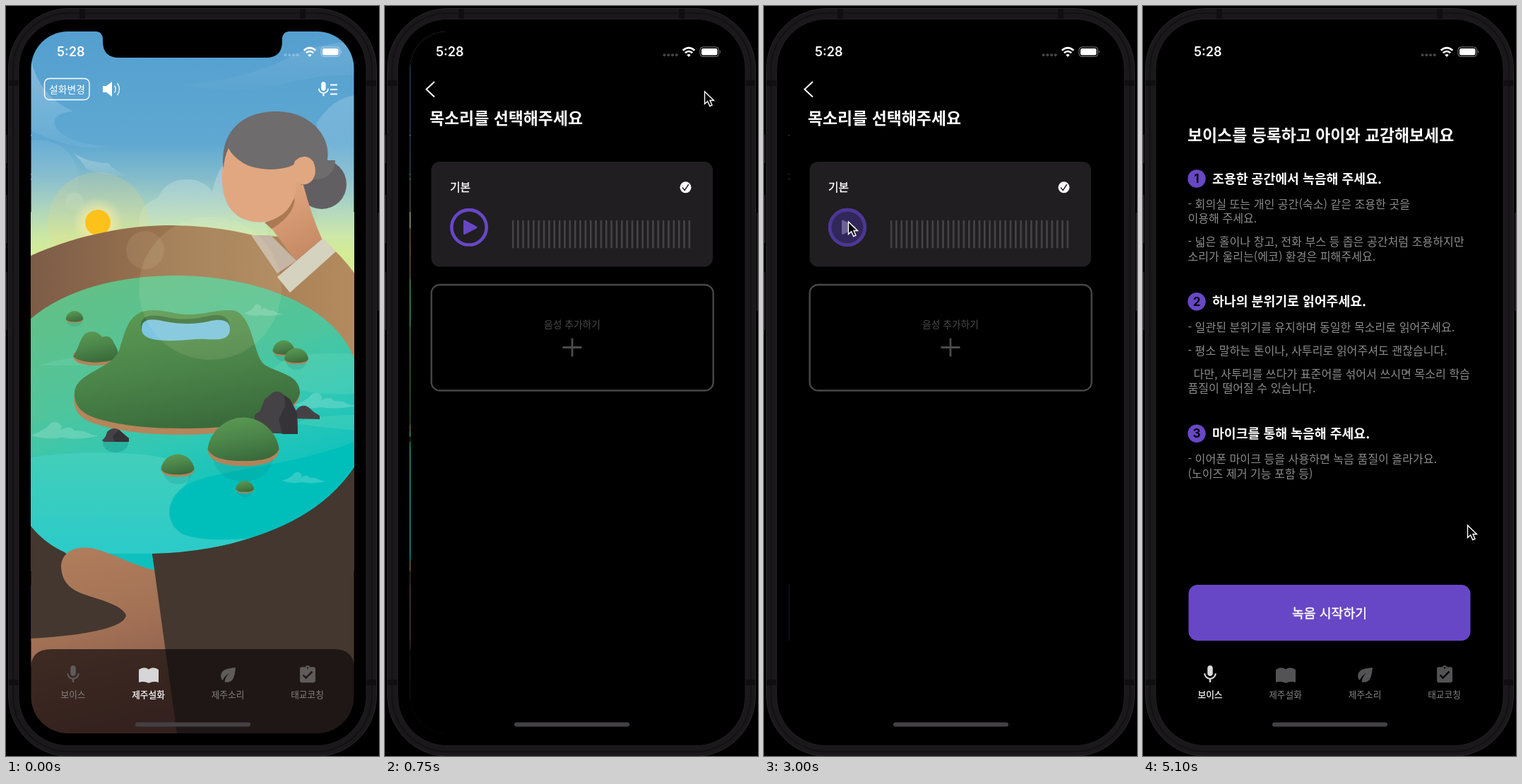
An HTML page that plays this animation: 528x1060 px, repeating every 5.2 s.

```html
<!DOCTYPE html>
<html lang="ko">
<head>
<meta charset="utf-8">
<title>Voice app walkthrough</title>
<style>
html, body { margin: 0; width: 100%; height: 100%; overflow: hidden; background: #000; }
svg { display: block; }
text { font-family: "Noto Sans CJK KR", "Noto Sans KR", "Noto Sans", sans-serif; fill: #fff; white-space: pre; }
.title { font-size: 22.9px; font-weight: 700; }
.head { font-size: 18.3px; font-weight: 700; }
.body text { font-size: 16.1px; fill: #8b8b8b; }
.num { font: 700 17px Inter, sans-serif; fill: #000; text-anchor: middle; }
.medium { stroke: #fff; stroke-width: .4px; }
.tab { font-size: 12.7px; text-anchor: middle; fill: #858283; }
.tab.on { fill: #fff; stroke: #fff; stroke-width: .25px; }
.mid { text-anchor: middle; }

/* one shared 5.2 s timeline */
.home, .picker, .voice, .cursor, .card, .pressed { animation: 5.2s linear infinite; }
.home { animation-name: home; }
.picker { animation-name: picker; }
.voice { animation-name: voice; }
.cursor { animation-name: cursor; animation-timing-function: ease-in-out; }
.card { animation-name: card; }
.pressed { animation-name: pressed; }

@keyframes home {
  0%, 9.94% { transform: translateX(0); opacity: 1; }
  10.58% { transform: translateX(-46px); }
  11.54% { transform: translateX(-110px); }
  12.5% { transform: translateX(-131px); }
  13.46%, 16.3% { transform: translateX(-136px); opacity: 1; }
  16.31%, 100% { transform: translateX(-137px); opacity: 0; }
}
@keyframes picker {
  0%, 9.94% { transform: translateX(458px); }
  10.58% { transform: translateX(305px); }
  11.54% { transform: translateX(92px); }
  12.5% { transform: translateX(22px); }
  13.46% { transform: translateX(5px); }
  14.42% { transform: translateX(1px); }
  15.38%, 74.58% { transform: translateX(0); }
  75% { transform: translateX(87px); }
  75.96% { transform: translateX(337px); }
  76.92% { transform: translateX(428px); }
  77.88% { transform: translateX(451px); }
  79.8%, 100% { transform: translateX(458px); }
}
@keyframes voice {
  0%, 74.58% { transform: translateX(-137px); }
  75% { transform: translateX(-111px); }
  75.96% { transform: translateX(-36px); }
  76.92% { transform: translateX(-9px); }
  77.88% { transform: translateX(-2px); }
  79.8%, 100% { transform: translateX(0); }
}
@keyframes cursor {
  0%, 1.91% { transform: translate(461px, 330px); opacity: 0; }
  1.92% { transform: translate(461px, 330px); opacity: 1; }
  8.65%, 18.85% { transform: translate(452px, 120px); }
  28.85%, 44.8% { transform: translate(183px, 259px); }
  54.8%, 65.4% { transform: translate(119px, 304px); }
  72.1%, 93.65% { transform: translate(273px, 484px); }
  98.05%, 100% { transform: translate(459px, 733px); opacity: 1; }
}
@keyframes card {
  0%, 29.5% { opacity: 1; }
  32.6%, 38.1% { opacity: .2; }
  42.3%, 100% { opacity: 1; }
}
@keyframes pressed {
  0%, 55.4% { opacity: 0; }
  57.7%, 65.2% { opacity: 1; }
  68.3%, 100% { opacity: 0; }
}
</style>
</head>
<body>
<svg width="528" height="1060" viewBox="0 0 528 1060">
<defs>
  <clipPath id="screen"><rect x="35.5" y="36" width="457" height="992" rx="52"/></clipPath>
  <linearGradient id="sky" gradientUnits="userSpaceOnUse" x1="0" y1="37" x2="0" y2="350">
    <stop offset="0" stop-color="#559fd0"/><stop offset=".5" stop-color="#5ea8d2"/>
    <stop offset=".66" stop-color="#84bccb"/><stop offset=".8" stop-color="#add5bc"/>
    <stop offset=".92" stop-color="#cbe7a4"/><stop offset="1" stop-color="#d5ec96"/>
  </linearGradient>
  <linearGradient id="mist" x1="0" y1="0" x2="0" y2="1">
    <stop offset="0" stop-color="#fff" stop-opacity=".28"/><stop offset="1" stop-color="#fff" stop-opacity=".05"/>
  </linearGradient>
  <radialGradient id="glow">
    <stop offset=".45" stop-color="#fff0a8" stop-opacity=".6"/><stop offset="1" stop-color="#fff0a8" stop-opacity="0"/>
  </radialGradient>
  <linearGradient id="robe">
    <stop offset="0" stop-color="#7d5c47"/><stop offset=".45" stop-color="#9d7650"/><stop offset="1" stop-color="#b48b5e"/>
  </linearGradient>
  <linearGradient id="sea" x1=".32" y1="0" x2=".68" y2="1">
    <stop offset="0" stop-color="#62c087"/><stop offset=".32" stop-color="#50c59c"/>
    <stop offset=".53" stop-color="#30c8b5"/><stop offset=".74" stop-color="#10c2bd"/><stop offset="1" stop-color="#0abfbf"/>
  </linearGradient>
  <linearGradient id="bay" x1="0" y1="0" x2="0" y2="1">
    <stop offset="0" stop-color="#43ceba"/><stop offset="1" stop-color="#2bcbc9"/>
  </linearGradient>
  <linearGradient id="grass" x1=".3" y1="0" x2=".6" y2="1">
    <stop offset="0" stop-color="#5a9953"/><stop offset=".5" stop-color="#4b8449"/><stop offset="1" stop-color="#396a3a"/>
  </linearGradient>
  <linearGradient id="skin" x1="0" y1="0" x2=".2" y2="1">
    <stop offset="0" stop-color="#b17f5c"/><stop offset=".45" stop-color="#a47356"/><stop offset="1" stop-color="#87574a"/>
  </linearGradient>
  <linearGradient id="neck" x1="0" y1="0" x2=".3" y2="1">
    <stop offset=".3" stop-color="#dfa47d"/><stop offset="1" stop-color="#c78c66"/>
  </linearGradient>
  <pattern id="bars" patternUnits="userSpaceOnUse" x="178.7" y="303" width="7.35" height="40">
    <rect width="2.5" height="39.5" fill="#464547"/>
  </pattern>
  <g id="islet">
    <ellipse cy="2" rx="43" ry="38" fill="#087f7c" opacity=".18"/>
    <path d="M-50-6C-50 11-30 18 0 18S50 11 50-6Z" fill="#b3835a"/>
    <path d="M-50-6C-47-30-25-50 0-50S47-30 50-6C45 7 26 11 0 11S-45 7-50-6Z" fill="url(#grass)"/>
  </g>
  <g id="wave" fill="#dff5ee" opacity=".22">
    <path d="M0 18Q14 14 22 7Q29-3 38 3Q43 8 38 12Q52 4 57 12L70 13Q78 18 90 19Q58 25 40 21Q20 25 0 18Z"/>
  </g>
  <path id="mic" d="M12 14c1.66 0 3-1.34 3-3V5c0-1.66-1.34-3-3-3S9 3.34 9 5v6c0 1.66 1.34 3 3 3zm5.3-3c0 3-2.54 5.1-5.3 5.1S6.7 14 6.7 11H5c0 3.4 2.7 6.2 6 6.7V21h2v-3.3c3.3-.5 6-3.3 6-6.7z"/>
  <path id="book" d="M188 938Q195 933 202 937.5Q209 933 216 938V956Q209 953.5 202 957Q195 953.5 188 956Z"/>
  <path id="leaf" d="M6 8c-2.7 2.7-2.7 7.2 0 9.9 1.5-3.4 4.1-6.2 7.4-7.9-2.8 2.3-4.7 5.6-5.4 9.3 2.6 1.2 5.8.8 8-1.4C19.4 14.5 20 4 20 4S9.5 4.6 6 8z"/>
  <path id="clip" d="M19 3h-4.2a3 3 0 0 0-5.6 0H5a2 2 0 0 0-2 2v14c0 1.1.9 2 2 2h14a2 2 0 0 0 2-2V5a2 2 0 0 0-2-2zm-7 0a1 1 0 1 1 0 2 1 1 0 0 1 0-2zm-2 14-4-4 1.4-1.4 2.6 2.6 6.6-6.6L18 9z"/>
  <use id="micTab" href="#mic" transform="translate(80 929.5) scale(1.25)"/>
  <g id="lastTabs">
    <use href="#leaf" transform="translate(299 929.8) scale(1.3)"/>
    <use href="#clip" transform="translate(412.4 930.6) scale(1.22)"/>
    <text class="tab" x="314" y="977.7">제주소리</text>
    <text class="tab" x="426.5" y="977.7">태교코칭</text>
  </g>
</defs>

<!-- phone body -->
<g fill="#1d1b1e">
  <path d="M0 182h2v40h-2zM0 267h2v68h-2zM0 376h2v82h-2zM526 292h2v139h-2z"/>
  <rect x="3.5" y="3.5" width="521" height="1057" rx="86" fill="#1a181b" stroke="#29272a"/>
  <rect x="10" y="10" width="508" height="1044" rx="79" fill="none" stroke="#131114" stroke-width="2"/>
  <path d="M104 4h8v14h-8zM416 4h8v14h-8zM4 105h14v8h-14zM510 105h14v8h-14zM4 952h14v8h-14zM510 952h14v8h-14z" fill="#100e11"/>
  <rect x="18" y="18.5" width="492" height="1027" rx="70" fill="#000" stroke="#211f23"/>
</g>

<g clip-path="url(#screen)">
  <!-- voice guide -->
  <g class="voice">
    <rect x="35" y="36" width="460" height="993" fill="#000"/>
    <text class="title" x="63" y="190.5">보이스를 등록하고 아이와 교감해보세요</text>
    <g fill="#6847c6"><circle cx="76" cy="244" r="12.7"/><circle cx="76" cy="417.7" r="12.7"/><circle cx="76" cy="604.3" r="12.7"/></g>
    <text class="num" x="76" y="250">1</text>
    <text class="num" x="76" y="423.8">2</text>
    <text class="num" x="76" y="610.4">3</text>
    <text class="head" x="98" y="250.7">조용한 공간에서 녹음해 주세요.</text>
    <text class="head" x="98" y="424.4">하나의 분위기로 읽어주세요.</text>
    <text class="head" x="98" y="611">마이크를 통해 녹음해 주세요.</text>
    <g class="body">
      <text x="63.5" y="285.5">- 회의실 또는 개인 공간(숙소) 같은 조용한 곳을</text>
      <text x="63.5" y="306">이용해 주세요.</text>
      <text x="63.5" y="339">- 넓은 홀이나 창고, 전화 부스 등 좁은 공간처럼 조용하지만</text>
      <text x="63.5" y="359.5">소리가 울리는(에코) 환경은 피해주세요.</text>
      <text x="63.5" y="459.5">- 일관된 분위기를 유지하며 동일한 목소리로 읽어주세요.</text>
      <text x="63.5" y="492.5">- 평소 말하는 톤이나, 사투리로 읽어주셔도 괜찮습니다.</text>
      <text x="71.5" y="525.5">다만, 사투리를 쓰다가 표준어를 섞어서 쓰시면 목소리 학습</text>
      <text x="63.5" y="546">품질이 떨어질 수 있습니다.</text>
      <text x="63.5" y="646">- 이어폰 마이크 등을 사용하면 녹음 품질이 올라가요.</text>
      <text x="63.5" y="666.5">(노이즈 제거 기능 포함 등)</text>
    </g>
    <rect x="64.5" y="818" width="399" height="79" rx="13" fill="#6847c6"/>
    <text class="mid medium" x="264" y="864.5" font-size="18.3">녹음 시작하기</text>
    <g fill="#535254">
      <use href="#micTab" fill="#dcdcdc"/><use href="#book"/><use href="#lastTabs"/>
      <text class="tab on" x="95" y="977.7">보이스</text><text class="tab" x="201.5" y="977.7">제주설화</text>
    </g>
  </g>

  <!-- story home -->
  <g class="home">
    <rect x="35" y="36" width="460" height="993" fill="url(#sky)"/>
    <g fill="url(#mist)">
      <path d="M35 74Q46 127 95 149Q63 151 70 171Q83 193 146 199Q100 207 35 176Z"/>
      <path d="M96 208Q117 222 145 222Q153 233 171 240Q128 239 114 230Q106 218 96 208Z"/>
      <path d="M495 50Q430 53 390 78Q330 105 250 112Q340 126 400 108Q450 96 495 98Z" opacity=".4"/>
      <path d="M440 165Q462 130 495 126V330H440Z" opacity=".65"/>
      <path d="M188 312C188 278 205 278 216 270C228 238 278 238 292 263C302 210 340 190 370 220V350H188Z"/>
      <path d="M35 190C80 185 105 215 103 254C99 275 70 300 35 290Z" opacity=".3"/>
      <circle cx="97" cy="277" r="13" opacity=".5"/>
    </g>
    <circle cx="130" cy="306" r="71" fill="#f0d878" opacity=".2"/>
    <circle cx="130" cy="306" r="36" fill="url(#glow)"/>
    <circle cx="130" cy="306" r="18" fill="#fcc21b"/>

    <!-- robe -->
    <path d="M35 353C88 329 158 311 225 310C275 310 315 315 350 324L447 329Q475 352 495 380V1029H35Z" fill="url(#robe)"/>
    <path d="M35 700L207 774L495 600V1029H35Z" fill="#44372f"/>

    <!-- head -->
    <circle cx="447" cy="252" r="35" fill="#625f62"/>
    <path d="M405 230L421 253Q432 295 447 329L410 360L372 309Z" fill="url(#neck)"/>
    <path d="M366 306Q390 299 409 271Q408 296 376 315Z" fill="#ab7953"/>
    <path d="M315 200C302 226 303 264 316 284C330 307 366 312 387 297C402 289 410 272 411 250L425 215Z" fill="#e1a780"/>
    <path d="M308 230C302 180 332 149 383 149C432 149 461 186 455 218L466 218C466 237 450 246 436 245L418 253L412 221C395 235 354 233 336 222Q321 213 315 201Q309 213 308 230Z" fill="#6e6c6d"/>
    <path d="M411 247Q403 232 409 219Q424 206 435 220Q442 237 432 248Q421 257 411 247Z" fill="#e1a780"/>
    <path d="M347 324H375L411 360L384 378Z" fill="#c4b5a4"/>
    <path d="M384 383L449 328L467 347L402 405Z" fill="#d5d2bf"/>

    <!-- sea -->
    <path d="M35 442C85 400 160 381 240 381C360 381 475 428 495 506V648C450 722 330 774 207 774L212 805H120L83 772Q54 759 35 735Z" fill="url(#sea)"/>
    <path d="M35 638Q110 627 195 634C250 640 275 660 248 682C222 704 228 738 254 748Q285 758 345 752Q275 774 207 774H83Q54 759 35 735Z" fill="url(#bay)"/>
    <path d="M495 615C410 650 300 655 260 675C223 695 225 732 250 746Q285 758 345 752Q450 720 495 648Z" fill="#00bfbb"/>
    <g fill="#7be0c0" opacity=".22">
      <path d="M48 508Q80 496 130 494L160 508Z"/>
      <path d="M400 495Q455 489 495 492V548Q440 550 418 543Q396 525 376 514Z"/>
      <path d="M410 590Q440 577 495 578V600Q450 596 410 590Z"/>
    </g>
    <use href="#wave" transform="translate(337 421) scale(.6 .75)"/>
    <use href="#wave" transform="translate(407 546)"/>
    <use href="#wave" transform="translate(35 587) scale(1.08)"/>
    <use href="#wave" transform="translate(391 658) scale(.68 .72)"/>

    <!-- islands -->
    <use href="#islet" transform="translate(97 443.5) scale(.25)"/>
    <path d="M96 497C97 512 152 511 159 499V490H96Z" fill="#b3835a"/>
    <path d="M95 495C106 480 105 460 122 460Q130 460 136 468Q148 463 153 477Q159 485 159 495C150 506 105 507 95 495Z" fill="url(#grass)"/>
    <path d="M97 548C94 571 103 583 128 591C166 603 208 606 250 606C330 606 417 585 416 545Z" fill="#b5855b"/>
    <path d="M97 546C99 518 148 514 160 487C169 461 172 430 207 430C232 430 240 437 263 436C286 435 297 429 319 430C350 432 349 493 366 507C384 519 416 520 416 547C410 581 332 598 250 597C206 597 168 594 132 584C108 577 96 566 97 546Z" fill="url(#grass)"/>
    <path d="M191 457C188 434 210 436 228 440C250 445 270 442 288 438C307 434 318 440 317 458Z" fill="#3d7440"/>
    <path d="M192 457C191 440 209 442 226 446C247 450 267 450 286 446C304 441 317 444 317 456C317 472 302 472 285 471C265 470 256 473 235 473C206 473 193 469 192 457Z" fill="#7dc5e1"/>
    <use href="#islet" transform="translate(393 489) scale(.31 .33)"/>
    <use href="#islet" transform="translate(411 500.5) scale(.34)"/>
    <g fill="#454246">
      <ellipse cx="155" cy="617" rx="18" ry="14" fill="#087f7c" opacity=".3"/>
      <path d="M136 614Q142 609 143 602Q151 594 160 599L167 606L174 611V616H139Z"/>
      <path d="M154 616L151 608L160 599L174 611V616Z" fill="#353237"/>
      <path d="M405 583L411 571Q419 561 428 567L436 574L444 579V584Z"/>
      <path d="M352 603V578L360 572L366 556L378 546Q386 542 394 550L402 556L412 575L413 605Z"/>
      <path d="M391 605L386 584L395 566L394 550L402 556L412 575L413 605Z" fill="#363338"/>
    </g>
    <use href="#islet" transform="translate(336 632) scale(1.01)"/>
    <use href="#islet" transform="translate(243 657) scale(.47)"/>
    <use href="#islet" transform="translate(338 684) scale(.26)"/>

    <!-- sleeve and hand -->
    <path d="M35 735Q54 759 83 772L180 860L35 897Z" fill="#44372f"/>
    <path d="M78 791C80 771 97 763 121 766C151 773 180 791 213 798L245 1029H35V894C105 890 168 880 170 861C164 845 126 838 104 829C85 821 78 807 78 791Z" fill="url(#skin)"/>
    <path d="M207 774Q260 773 320 760L350 1029H242Z" fill="#44372f"/>
    <circle cx="289" cy="399" r="101" fill="#fff3c0" opacity=".1"/>
    <circle cx="197" cy="345" r="27" fill="#fff3c0" opacity=".09"/>

    <!-- top controls -->
    <rect x="54.5" y="102.5" width="63.5" height="30" rx="7" fill="none" stroke="#fff" stroke-width="1.4"/>
    <text class="mid" x="86.5" y="122.6" font-size="13.8">설화변경</text>
    <path d="M137 113H142L150 107V128L142 122H137Z" fill="#fff"/>
    <path d="M153.5 112.5q3.5 5 0 10M157.5 109q6 8.5 0 17" fill="none" stroke="#fff" stroke-width="1.5" opacity=".85"/>
    <use href="#mic" fill="#fff" transform="translate(436.7 105) scale(1.06)"/>
    <path d="M459 111.5h10M459 118h10M459 124.5h10" stroke="#fff" stroke-width="2.2"/>

    <path d="M35 937Q35 909 64 909H464Q493 909 493 937V1029H35Z" fill="#0a0709" opacity=".65"/>
    <g fill="#5f5b5b">
      <use href="#micTab"/><use href="#book" fill="#d6d5d7"/><use href="#lastTabs"/>
      <text class="tab" x="95" y="977.7">보이스</text><text class="tab on" x="201.5" y="977.7">제주설화</text>
    </g>
  </g>

  <!-- voice picker -->
  <g class="picker">
    <rect x="35" y="36" width="460" height="993" fill="#000"/>
    <path d="M69 107L57.5 117.7L69 128.5" fill="none" stroke="#fff" stroke-width="2"/>
    <text class="title" x="62" y="167">목소리를 선택해주세요</text>
    <rect x="64.5" y="220" width="398.5" height="148.5" rx="12" fill="#201e21"/>
    <g class="card">
      <text class="medium" x="91" y="262" font-size="15.8">기본</text>
      <circle cx="424.5" cy="256.3" r="8" fill="#fff"/>
      <path d="M420 256.5l3.2 4 5.6-8.5" fill="none" stroke="#201e21" stroke-width="1.4"/>
      <rect x="178.7" y="303" width="253" height="39.5" fill="url(#bars)"/>
    </g>
    <circle cx="118" cy="312.8" r="24.7" fill="none" stroke="#6847c6" stroke-width="4.6"/>
    <path d="M111.5 304V321.5L128 312.8Z" fill="#6847c6" stroke="#6847c6" stroke-width="3" stroke-linejoin="round"/>
    <g class="pressed">
      <circle cx="118" cy="312.8" r="24.7" fill="#31275a" stroke="#4c3795" stroke-width="4.6"/>
      <path d="M111.5 304V321.5L128 312.8Z" fill="#6b6296" stroke="#6b6296" stroke-width="3" stroke-linejoin="round"/>
    </g>
    <rect x="64.7" y="394" width="399" height="149.5" rx="12" fill="none" stroke="#474648" stroke-width="2.4"/>
    <text class="mid" x="264" y="455.3" font-size="13.8" style="fill:#4b4a4c">음성 추가하기</text>
    <path d="M250.5 482.5h27M264 469.5v26" stroke="#4b4a4c" stroke-width="2.8"/>
  </g>
  <rect x="183" y="1012.5" width="163" height="6" rx="3" fill="#434144"/>
</g>

<!-- notch and status bar -->
<path d="M128 35V36Q137 37 137 47V50Q137 73 160 73H368Q391 73 391 50V47Q391 37 400 36V35Z"/>
<text x="72" y="71.3" style="font:600 18px Inter,sans-serif">5:28</text>
<g fill="#fff" opacity=".27"><circle cx="395.5" cy="69.3" r="2"/><circle cx="401.3" cy="69.3" r="2"/><circle cx="407" cy="69.3" r="2"/><circle cx="412.7" cy="69.3" r="2"/></g>
<g fill="none" stroke="#fff" stroke-width="2.6">
  <path d="M421.7 62.8Q430 55.5 438.3 62.8M424.8 66.3Q430 61.7 435.2 66.3"/>
  <path d="M427.3 69.2Q430 66.8 432.7 69.2L430 72Z" fill="#fff" stroke="none"/>
</g>
<rect x="446" y="58" width="26.5" height="13.5" rx="4" fill="none" stroke="#fff" opacity=".5"/>
<rect x="448" y="60" width="22.5" height="9.5" rx="2.3" fill="#fff"/>
<path d="M474 62.5Q476 64.7 474 67Z" fill="#fff" opacity=".5"/>

<g class="cursor">
  <path d="M.5 1V18.5L4.6 14.7L7.8 21.5L11 20.1L8 13.5H13.5Z" fill="#000" stroke="#fff" stroke-width="1.4"/>
</g>
</svg>
</body>
</html>
```
